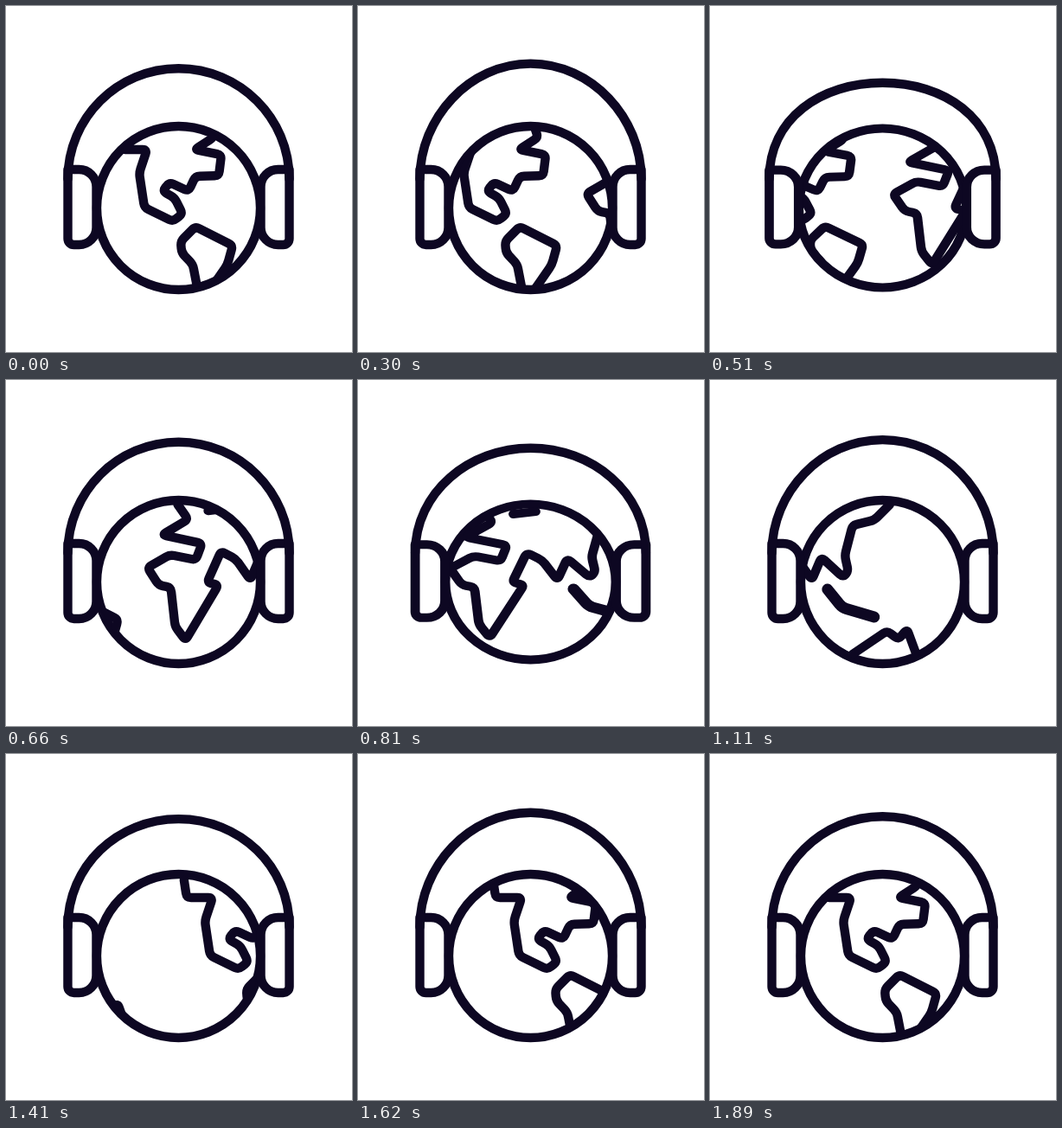
Write an HTML page with a canvas that moves like this. It is 400 by 400 pixels and loops after 1920 ms.

```html
<!DOCTYPE html>
<html lang="en">
<head>
<meta charset="utf-8">
<title>Globe with headphones</title>
<style>
  html, body { margin: 0; width: 100%; height: 100%; overflow: hidden; background: #fff; }
  canvas { display: block; width: 400px; height: 400px; }
</style>
</head>
<body>
<canvas id="stage" width="400" height="400"></canvas>
<script>
const ctx = document.getElementById('stage').getContext('2d');
const INK = '#0d0722', LINE = 10.4;
const LOOP = 1920, STEP = 30, SPIN = 1890;
const BEAT = 384, DANCE = 4 * BEAT;
const CX = 199.5, CY = 233.5, R = 94.5;
const LAP = 472; // width of the unrolled map

// Corner points on the unrolled map, as x,y pairs
const northAmerica = [130, 146, 133, 166, 163, 166, 154, 193, 160, 233, 193, 249, 204, 240, 195, 222,
  181, 214, 189, 204, 211, 214, 219, 197, 246, 196, 249, 172, 218, 166, 240, 152, 236, 140];
const southAmerica = [222, 330, 216, 299, 203, 285, 202, 272, 219, 255, 262, 277, 256, 299, 236, 328];
const europe = [331, 144, 343, 161, 313, 179, 359, 189, 352, 208, 322, 202, 296, 217];
const africa = [296, 217, 309, 237, 323, 240, 328, 285, 340, 301, 378, 237, 365, 234, 381, 198];
const asia = [381, 198, 398, 207, 415, 231, 426, 205, 451, 228, 457, 221, 453, 203, 462, 168, 487, 162, 505, 144];
const antarctica = [462, 317, 502, 290, 515, 300, 525, 288, 536, 318];
const islands = [366, 151, 391, 148];
const australia = [433, 242, 450, 263, 487, 274];
const eurasia = [...europe, ...africa.slice(2), ...asia.slice(2)];
const coasts = [northAmerica, southAmerica, eurasia, antarctica, islands];

const smooth = p => p * p * (3 - 2 * p);
const mix = (a, b, p) => a + (b - a) * p;

// Quick press, slower release; peaks at 1
function squashAt(t) {
  if (t >= DANCE) return 0;
  const x = (t % BEAT) / 65;
  return (x * Math.exp(1 - x)) ** 3;
}

// Top edge of the headband: sinks, springs up, settles
function bandTop(t) {
  const rest = 67, low = 84, high = 61, sunk = 100, sprung = 302;
  if (t >= DANCE) return rest - 6.5 * Math.sin(Math.PI * Math.min((t - DANCE) / (SPIN - DANCE), 1));
  const p = t % BEAT;
  if (p < sunk) return mix(rest, low, smooth(p / sunk));
  if (p < sprung) return mix(low, high, ((p - sunk) / (sprung - sunk)) ** 2);
  return mix(high, rest, smooth((p - sprung) / (BEAT - sprung)));
}

// Polyline with softened corners
function strokeCoast(flat) {
  const pts = [];
  for (let i = 0; i < flat.length; i += 2) pts.push([flat[i], flat[i + 1]]);
  const toward = (a, b) => {
    const d = Math.hypot(b[0] - a[0], b[1] - a[1]);
    const p = Math.min(5 / d, .5);
    return [mix(a[0], b[0], p), mix(a[1], b[1], p)];
  };
  ctx.beginPath();
  ctx.moveTo(...pts[0]);
  for (let i = 1; i < pts.length - 1; i++) {
    ctx.lineTo(...toward(pts[i], pts[i - 1]));
    ctx.quadraticCurveTo(...pts[i], ...toward(pts[i], pts[i + 1]));
  }
  ctx.lineTo(...pts[pts.length - 1]);
  ctx.stroke();
}

function drawGlobe(shift, sx, sy) {
  ctx.save();
  ctx.translate(CX, CY);
  ctx.scale(sx, sy);
  ctx.beginPath();
  ctx.arc(0, 0, R, 0, Math.PI * 2);
  ctx.stroke();
  ctx.clip();
  ctx.translate(-CX - shift, -CY);
  for (let lap = 0; lap < 2; lap++) {
    ctx.lineWidth = LINE;
    coasts.forEach(strokeCoast);
    ctx.lineWidth = 13;
    strokeCoast(australia);
    ctx.translate(LAP, 0);
  }
  ctx.restore();
}

function drawCup(side, sx, sy) {
  ctx.save();
  ctx.translate(CX, 232.5);
  ctx.scale(side * sx, sy);
  ctx.beginPath();
  ctx.roundRect(-128, -43.5, 33, 87, [0, 20, 20, 7]);
  ctx.stroke();
  ctx.restore();
}

// Only the middle of the band rises and falls; the curve handles keep their length
function drawBand(top, sx) {
  const half = 128 * sx, base = 200, handle = 70.7;
  ctx.beginPath();
  ctx.moveTo(CX - half, base);
  ctx.bezierCurveTo(CX - half, base - handle, CX - handle, top, CX, top);
  ctx.bezierCurveTo(CX + handle, top, CX + half, base - handle, CX + half, base);
  ctx.stroke();
}

function draw(t) {
  const squash = squashAt(t);
  const sx = 1 + .054 * squash;

  ctx.fillStyle = '#fff';
  ctx.fillRect(0, 0, 400, 400);
  ctx.strokeStyle = INK;
  ctx.lineWidth = LINE;
  ctx.lineJoin = ctx.lineCap = 'round';

  drawGlobe(LAP * smooth(Math.min(t / SPIN, 1)), sx, 1 - .062 * squash);
  for (const side of [-1, 1]) drawCup(side, sx, 1 - .035 * squash);
  drawBand(bandTop(t) + LINE / 2, sx);
}

const start = performance.now();
function tick() {
  const t = (performance.now() - start) % LOOP;
  draw(Math.floor(t / STEP) * STEP);
  requestAnimationFrame(tick);
}
tick();
</script>
</body>
</html>
```
